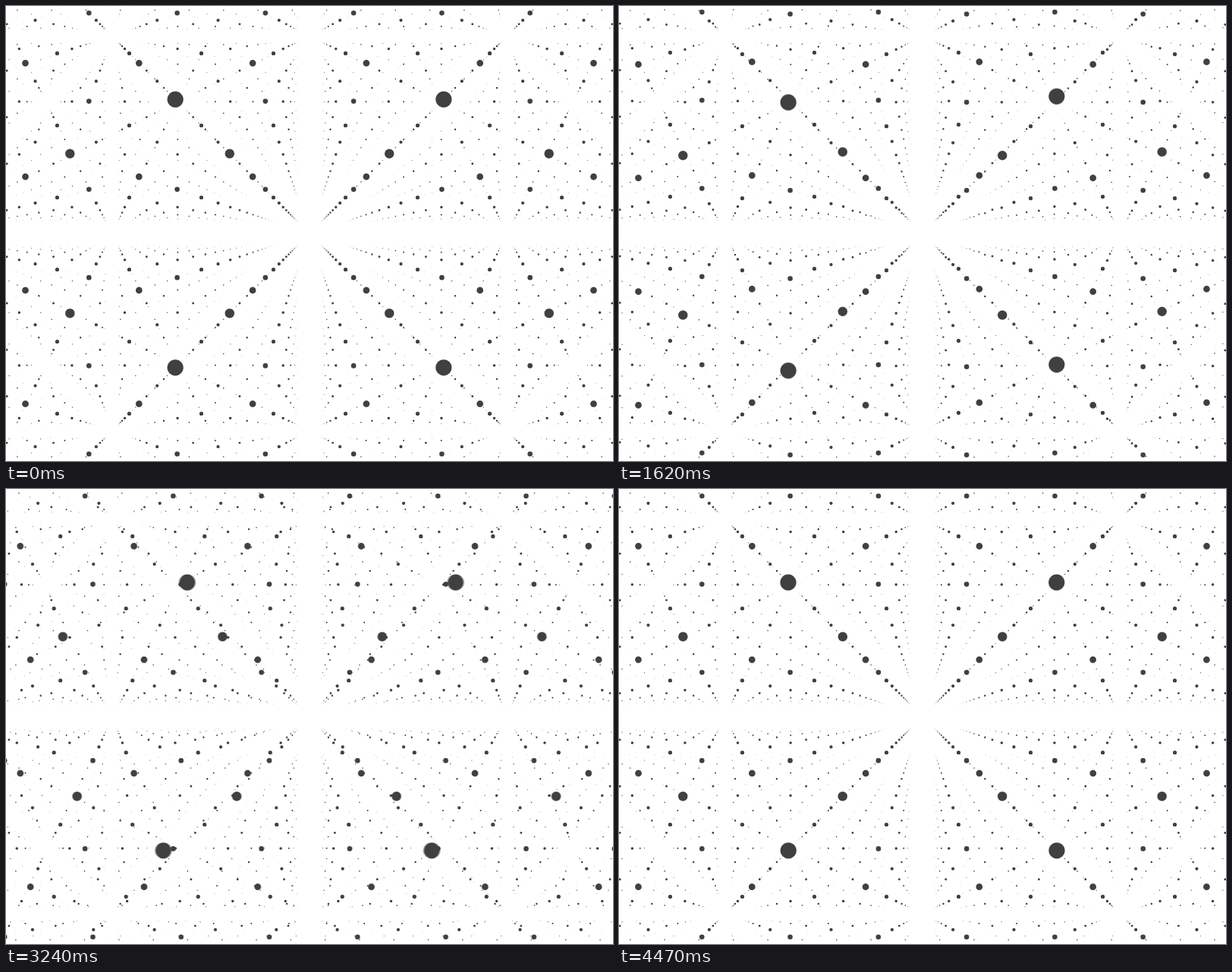
An HTML page with a canvas that plays this animation: 800 px wide and 600 px high, repeating every 4500 ms.

```html
<!DOCTYPE html>
<html>
<head>
<meta charset="utf-8">
<style>
html, body { margin: 0; width: 100%; height: 100%; overflow: hidden; background: #fff; }
canvas { display: block; }
</style>
</head>
<body>
<canvas id="stage" width="800" height="600"></canvas>
<script>
const W = 800, H = 600;
const FOCAL = H / 2 / Math.tan(Math.PI / 6);
const NEAR = 1.469, FAR = 18, DOT = 15.7;      // in lattice units, DOT in px at depth 1
const FRAME = 30, FRAMES = 150, PHASE = 50;
const SAMPLES = 6, SHUTTER = 0.12;             // motion blur

const ctx = document.getElementById('stage').getContext('2d');
const layer = document.createElement('canvas');
layer.width = W;
layer.height = H;
const pen = layer.getContext('2d');

function ease(p) {
  const a = Math.pow(p, 1.9), b = Math.pow(1 - p, 1.9);
  return a / (a + b);
}

// Odd cells travel one way, even cells the other.
const sign = n => (n & 1 ? 1 : -1);

function drawLattice(time) {
  const phase = Math.floor(time / PHASE) % 3;
  const shift = ease(time % PHASE / PHASE);
  pen.fillStyle = '#fff';
  pen.fillRect(0, 0, W, H);
  pen.fillStyle = '#404040';
  for (let n = -1; n < FAR; n++) {
    const cols = Math.ceil((n + 3) * W / 2 / FOCAL) + 2;
    const rows = Math.ceil((n + 3) * H / 2 / FOCAL) + 2;
    pen.beginPath();
    for (let i = -cols; i < cols; i++) {
      for (let j = -rows; j < rows; j++) {
        let x = i + 0.5, y = j + 0.5, z = NEAR + n;
        if (phase === 0) z -= sign(i + j) * shift;
        else if (phase === 1) y += sign(i + n) * shift;
        else x += sign(j + n) * shift;
        if (z < 0.4 || z > FAR) continue;

        const px = W / 2 + x * FOCAL / z;
        const py = H / 2 + y * FOCAL / z;
        const r = DOT / z * (1 - (z / FAR) ** 2);
        if (px < -r || px > W + r || py < -r || py > H + r) continue;
        pen.moveTo(px + r, py);
        pen.arc(px, py, r, 0, 2 * Math.PI);
      }
    }
    pen.fill();
  }
}

function render(frame) {
  for (let k = 0; k < SAMPLES; k++) {
    drawLattice(frame + k * SHUTTER);
    ctx.globalAlpha = 1 / (k + 1);             // running mean of the samples
    ctx.drawImage(layer, 0, 0);
  }
}

const start = performance.now();
let shown = -1;

function tick() {
  const frame = Math.floor((performance.now() - start) / FRAME) % FRAMES;
  if (frame !== shown) render(shown = frame);
  requestAnimationFrame(tick);
}
tick();
</script>
</body>
</html>
```
